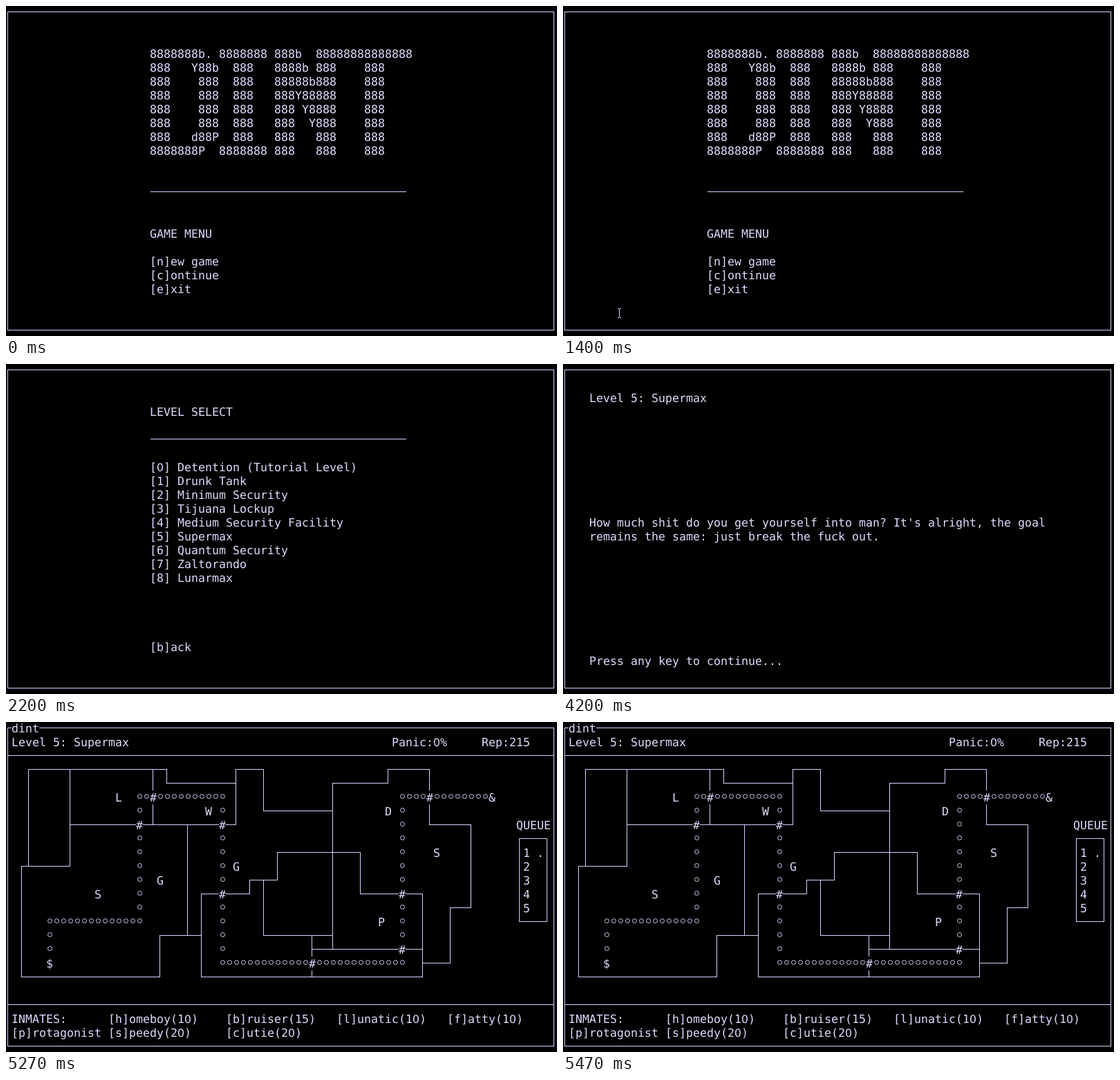
Recreate the animation shown at these times as an HTML page. Size 797 px wide and 477 px high, loop 8 s.

```html
<!DOCTYPE html>
<html lang="en">
<head>
<meta charset="utf-8">
<title>Prison game</title>
<style>
  html, body { margin: 0; width: 100%; height: 100%; overflow: hidden; background: #000; }
  svg { display: block; width: 797px; height: 477px; }
  text {
    font: 16.61px "DejaVu Sans Mono", "Liberation Mono", monospace;
    fill: #dcdcff; white-space: pre; text-rendering: geometricPrecision;
  }
  .zero { font: 15.72px "DejaVu Sans", sans-serif; }
  .ink { fill: none; stroke: #d2d2ff; shape-rendering: crispEdges; }
  .dot { fill: none; stroke: #d2d2ff; }
  .scene, #pointer { visibility: hidden; animation: 8s step-end infinite; }
  #menu { animation-name: menu; }
  #levels { animation-name: levels; }
  #brief { animation-name: brief; }
  #game { animation-name: game; }
  #pointer { animation-name: pointer; }
  @keyframes menu { 0% { visibility: visible } 25.875%, 100% { visibility: hidden } }
  @keyframes levels { 0% { visibility: hidden } 25.875% { visibility: visible } 52.5%, 100% { visibility: hidden } }
  @keyframes brief { 0% { visibility: hidden } 52.5% { visibility: visible } 65.875%, 100% { visibility: hidden } }
  @keyframes game { 0% { visibility: hidden } 65.875%, 100% { visibility: visible } }
  @keyframes pointer {
    0% { visibility: hidden; transform: translate(398px, 483px) }
    1.625% { visibility: visible; transform: translate(398px, 483px) }
    2.5% { visibility: hidden; transform: translate(22px, 292px) }
    14.125% { visibility: visible; transform: translate(22px, 292px) }
    15% { visibility: visible; transform: translate(41px, 345px) }
    15.875% { visibility: visible; transform: translate(58px, 393px) }
    16.625% { visibility: visible; transform: translate(73px, 428px) }
    17.5% { visibility: visible; transform: translate(81px, 444px) }
    25.875%, 100% { visibility: hidden; transform: translate(81px, 444px) }
  }
</style>
</head>
<body>
<svg viewBox="0 0 797 477">
  <path class="ink" d="M2.5 8.5H792.5V468.5H2.5Z"/>
  <g id="menu" class="scene"></g>
  <g id="levels" class="scene"></g>
  <g id="brief" class="scene"></g>
  <g id="game" class="scene"></g>
  <path id="pointer" class="ink" d="M-2 -6.5H0M1 -6.5H3M.5 -6V6M-2 6.5H0M1 6.5H3"/>
</svg>
<script>
  // Character grid: 10 x 20 px cells, column 0 starts at x = -2.
  const text = (col, row, str) => {
    const body = str.replace(/&/g, '&amp;').replace(/0/g, '<tspan class="zero">0</tspan>');
    return `<text x="${col * 10 - 2}" y="${row * 20 + 15}">${body}</text>`;
  };
  const lines = (col, row, list) => list.map((s, i) => text(col, row + i, s)).join('');
  const ink = d => `<path class="ink" transform="translate(.5 .5)" d="${d}"/>`;
  const blank = (col, row, n = 1) =>
    `<rect x="${col * 10 - 2}" y="${row * 20 - 1}" width="${n * 10}" height="20"/>`;
  const dot = (col, row) => `<circle class="dot" cx="${col * 10 + 3.5}" cy="${row * 20 + 7.5}" r="3"/>`;
  const show = (id, ...parts) => { document.getElementById(id).innerHTML = parts.join(''); };

  show('menu',
    lines(21, 3, [
      '8888888b. 8888888 888b  88888888888888',
      '888   Y88b  888   8888b 888    888',
      '888    888  888   88888b888    888',
      '888    888  888   888Y88888    888',
      '888    888  888   888 Y8888    888',
      '888    888  888   888  Y888    888',
      '888   d88P  888   888   888    888',
      '8888888P  8888888 888   888    888'
    ]),
    ink('M208 268H578'),
    text(21, 16, 'GAME MENU'),
    lines(21, 18, ['[n]ew game', '[c]ontinue', '[e]xit']));

  const levels = ['Detention (Tutorial Level)', 'Drunk Tank', 'Minimum Security',
    'Tijuana Lockup', 'Medium Security Facility', 'Supermax', 'Quantum Security',
    'Zaltorando', 'Lunarmax'];
  show('levels',
    text(21, 3, 'LEVEL SELECT'),
    ink('M208 108H578'),
    lines(21, 7, levels.map((name, i) => `[${i}] ${name}`)),
    text(21, 20, '[b]ack'));

  show('brief',
    text(4, 2, 'Level 5: Supermax'),
    lines(4, 11, [
      "How much shit do you get yourself into man? It's alright, the goal",
      'remains the same: just break the fuck out.'
    ]),
    text(4, 21, 'Press any key to continue...'));

  const walls = ink(
    'M32 208V68H232V88H332M332 148V68H372V128H472M92 68V208H22V368H222V308H282' +
    'M92 148H332M212 68V148M262 148V308M602 368H282V248H352V228H392V188H512V248H602V368' +
    'M372 228V308H472M472 328V88H552V68H612V148H672V268H642V348H602' +
    'M442 308V368M442 328H602');

  const corners = [[6, 17], [6, 14], [19, 14], [19, 5], [31, 5], [31, 17], [57, 17], [57, 5], [70, 5]];
  const gates = [[19, 7], [21, 5], [31, 7], [31, 12], [44, 17], [57, 16], [57, 12], [61, 5]];
  const isGate = (c, r) => gates.some(g => g[0] === c && g[1] === r);

  function trail() {
    let out = '', [c, r] = corners[0];
    for (const [toC, toR] of corners.slice(1)) {
      while (c !== toC || r !== toR) {
        c += Math.sign(toC - c);
        r += Math.sign(toR - r);
        if (c < 70 && !isGate(c, r)) out += dot(c, r);
      }
    }
    return out;
  }

  const guards = [['L', 16, 5], ['W', 29, 6], ['G', 33, 10], ['G', 22, 11],
    ['S', 13, 12], ['D', 55, 6], ['S', 62, 9], ['P', 54, 14]];

  show('game',
    blank(1, 0, 4), text(1, 0, 'dint'),
    text(1, 1, 'Level 5: Supermax'), text(56, 1, 'Panic:0%'), text(69, 1, 'Rep:215'),
    ink('M2 48H792M2 408H792'),
    walls, trail(),
    gates.map(([c, r]) => blank(c, r) + text(c, r, '#')).join(''),
    text(6, 17, '$'), text(70, 5, '&'),
    guards.map(([ch, c, r]) => text(c, r, ch)).join(''),
    text(74, 7, 'QUEUE'), ink('M742 168H782V288H742Z'),
    lines(75, 9, ['1 .', '2', '3', '4', '5']),
    lines(1, 21, ['INMATES:', '[p]rotagonist']),
    lines(15, 21, ['[h]omeboy(10)', '[s]peedy(20)']),
    lines(32, 21, ['[b]ruiser(15)', '[c]utie(20)']),
    text(48, 21, '[l]unatic(10)'), text(64, 21, '[f]atty(10)'));
</script>
</body>
</html>
```
